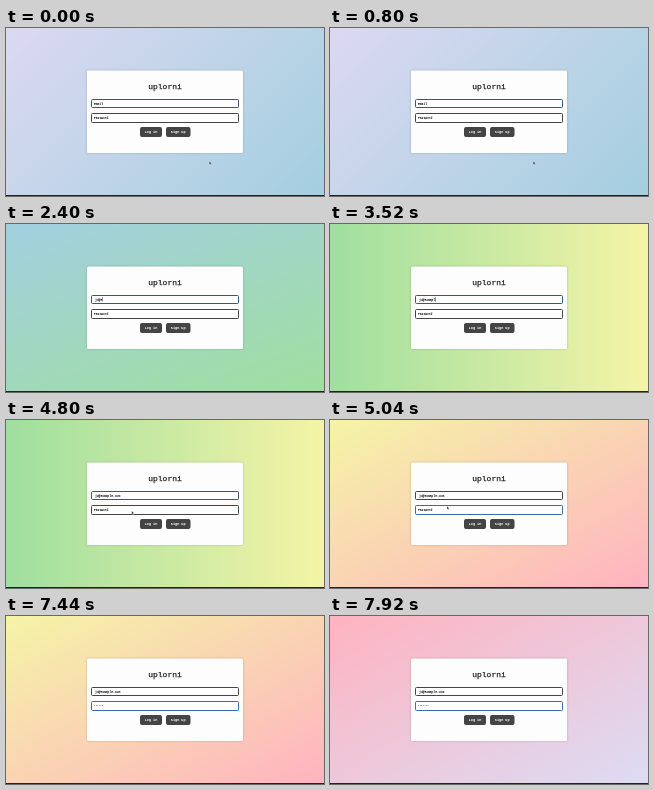
An HTML page that plays this animation: 318x168 px, repeating every 8000 ms.

```html
<!DOCTYPE html>
<html lang="en">
<head>
<meta charset="utf-8">
<title>Log in</title>
<style>
  html, body { margin: 0; width: 100%; height: 100%; overflow: hidden; }
  svg { display: block; width: 318px; height: 168px; }
  text { font-family: "Liberation Mono", monospace; font-size: 3px; fill: #111; white-space: pre; }
  .card { fill: #fdfdfd; filter: drop-shadow(0 0 .8px #0003); }
  .title { font-size: 8px; text-anchor: middle; fill: #222; stroke: #222; stroke-width: .25px; }
  .field { fill: #fff; stroke: #444; stroke-width: 1px; }
  .field.focus { stroke: #34577f; }
  #pass.focus { stroke: #3a6aa8; }
  #mailText, #passText { stroke: #111; stroke-width: .1px; }
  #passText.dots { fill: #555; stroke: none; font-size: 2.6px; }
  .button { fill: #444; }
  .label { font-size: 3.5px; font-weight: bold; fill: #fff; text-anchor: middle; }
</style>
</head>
<body>
<svg viewBox="0 0 318 168">
  <rect class="card" x="81" y="42.5" width="156" height="82.5" rx="1.5"/>
  <text class="title" x="159" y="61">uplorni</text>
  <rect class="field" id="mail" x="85.5" y="71.5" width="147" height="8" rx="1"/>
  <rect class="field" id="pass" x="85.5" y="85.5" width="147" height="9" rx="1"/>
  <text id="mailText" y="76.6"></text>
  <text id="passText" x="88" y="91.3"></text>
  <rect id="caret" y="73.3" width=".5" height="4.2" fill="#222"/>
  <rect class="button" x="134" y="99" width="22" height="10" rx="2"/>
  <text class="label" x="145" y="105">Log in</text>
  <rect class="button" x="160" y="99" width="24.5" height="10" rx="2"/>
  <text class="label" x="172.2" y="105">Sign up</text>
  <path id="mouse" d="M0 0V3.2L.8 2.5 1.3 3.6 1.8 3.4 1.3 2.3H2.3Z" fill="#111" stroke="#fff" stroke-width=".3"/>
  <rect y="167" width="318" height="1" fill="#222"/>
</svg>
<script>
const LOOP = 8000, CHAR = 1.8;
const EMAIL = "jo@example.com";
const emailKeys = [960, 1280, 1600, 2160, 2880, 3040, 3200, 3360, 3520, 3680, 3760, 4000, 4080, 4240];
const passKeys = [6160, 6240, 7040, 7120, 7200, 7440, 7920];
const FOCUS_PASS = 4880;

const lavender = "#dcd9f1", blue = "#a3cfe0", green = "#9fdf9f", yellow = "#f5f4a6", pink = "#ffb3c0";
const skies = [
  [0, "135deg", lavender, blue],
  [1840, "160deg", blue, green],
  [2560, "90deg", green, yellow],
  [5040, "to bottom right", yellow, pink],
  [7520, "to bottom right", pink, "#dcdcf4"],
];

const $ = id => document.getElementById(id);
const typed = (keys, t) => keys.filter(k => k <= t).length;

function draw(t) {
  const [, angle, from, to] = skies.findLast(s => s[0] <= t);
  document.body.style.background = `linear-gradient(${angle}, ${from}, ${to})`;

  const letters = typed(emailKeys, t), dots = typed(passKeys, t);
  const mailX = letters ? 89 : 88;
  $("mailText").textContent = EMAIL.slice(0, letters) || "Email";
  $("mailText").setAttribute("x", mailX);
  $("passText").textContent = "•".repeat(dots) || "Password";
  $("passText").classList.toggle("dots", dots > 0);

  const onPass = t >= FOCUS_PASS;
  $("mail").classList.toggle("focus", !onPass);
  $("pass").classList.toggle("focus", onPass);

  const typing = letters > 0 && t < 4480;
  $("caret").setAttribute("x", mailX + letters * CHAR);
  $("caret").style.display = typing ? "" : "none";

  // The pointer hides while keys are pressed.
  const p = Math.min(1, Math.max(0, (t - 4480) / 400));
  const ease = p * p * (3 - 2 * p);
  $("mouse").setAttribute("transform", `translate(${203.3 - 86.3 * ease} ${133.2 - 47 * ease})`);
  $("mouse").style.display = typing || dots ? "none" : "";
}

function tick() {
  draw(performance.now() % LOOP);
  requestAnimationFrame(tick);
}
tick();
</script>
</body>
</html>
```
